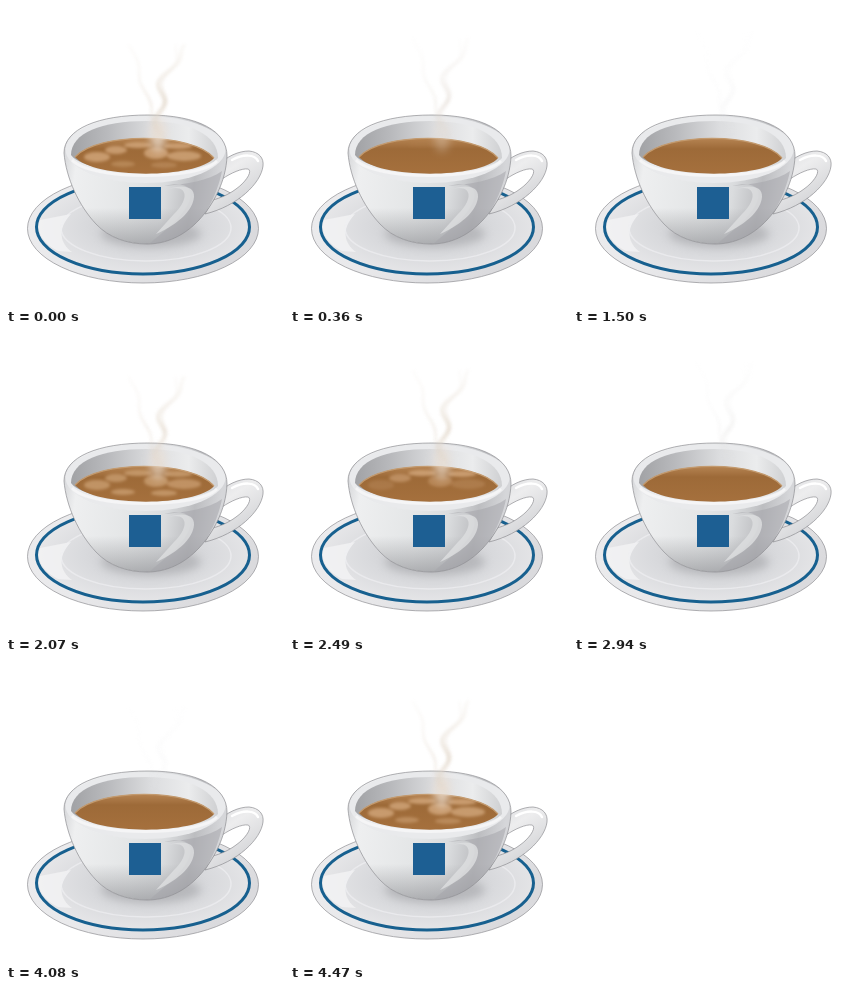
Animation of 278 by 300 pixels, one loop 4.5 s. Source, as an HTML page:

```html
<!DOCTYPE html>
<html lang="en">
<head>
<meta charset="utf-8">
<title>Coffee cup</title>
<style>
  html, body { margin: 0; width: 100%; height: 100%; overflow: hidden; background: #fff; }
  svg { display: block; width: 278px; height: 300px; }
  .edge { fill: none; stroke: #8e8f92; stroke-width: .7; }
</style>
</head>
<body>
<svg viewBox="0 0 278 300">
  <defs>
    <radialGradient id="plate" cx=".52" cy=".5" r=".55">
      <stop offset="0" stop-color="#c6c7ca"/><stop offset=".55" stop-color="#d9dadd"/>
      <stop offset="1" stop-color="#e8e8ea"/>
    </radialGradient>
    <linearGradient id="plateRim" x2="1" y2=".5">
      <stop offset="0" stop-color="#ececee"/><stop offset=".5" stop-color="#e9e9eb"/>
      <stop offset="1" stop-color="#dadadd"/>
    </linearGradient>
    <linearGradient id="body" x2="1" y2=".12">
      <stop offset="0" stop-color="#cdced1"/><stop offset=".12" stop-color="#eeeff0"/>
      <stop offset=".5" stop-color="#e3e5e6"/><stop offset=".68" stop-color="#dadcde"/>
      <stop offset=".85" stop-color="#bcbdc0"/><stop offset="1" stop-color="#d5d6d9"/>
    </linearGradient>
    <linearGradient id="under" x2="0" y2="1">
      <stop offset=".72" stop-color="#8a8b8f" stop-opacity="0"/><stop offset="1" stop-color="#8a8b8f" stop-opacity=".6"/>
    </linearGradient>
    <linearGradient id="wall" x2="1">
      <stop offset="0" stop-color="#a1a2a5"/><stop offset=".25" stop-color="#b9babd"/>
      <stop offset=".55" stop-color="#dcdddf"/><stop offset=".8" stop-color="#ebeced"/>
      <stop offset="1" stop-color="#cfd0d2"/>
    </linearGradient>
    <linearGradient id="grip" x2=".6" y2="1">
      <stop offset="0" stop-color="#d9dadd"/><stop offset=".4" stop-color="#ededee"/>
      <stop offset="1" stop-color="#cfd0d3"/>
    </linearGradient>
    <linearGradient id="coffee" x2="0" y2="1">
      <stop offset="0" stop-color="#b58352"/><stop offset=".3" stop-color="#9d6a38"/>
      <stop offset="1" stop-color="#a5703d"/>
    </linearGradient>
    <linearGradient id="fade" gradientUnits="userSpaceOnUse" x1="0" y1="36" x2="0" y2="136">
      <stop offset="0" stop-color="#fff" stop-opacity=".15"/><stop offset=".35" stop-color="#fff" stop-opacity=".5"/>
      <stop offset=".6" stop-color="#fff"/><stop offset="1" stop-color="#fff" stop-opacity="0"/>
    </linearGradient>
    <mask id="steamMask" maskUnits="userSpaceOnUse" x="0" y="0" width="278" height="300">
      <rect width="278" height="300" fill="url(#fade)"/>
    </mask>
    <filter id="soft" filterUnits="userSpaceOnUse" x="0" y="0" width="278" height="300"><feGaussianBlur stdDeviation="1.6"/></filter>
    <filter id="shade" filterUnits="userSpaceOnUse" x="0" y="0" width="278" height="300"><feGaussianBlur stdDeviation="4"/></filter>
    <path id="bowl" d="M58 147C58 123 92 109 142 109S221 125 221 150C220 176 207 199 193 214C178 230 160 238 141 238C122 238 103 232 90 218C73 200 60 172 58 147Z"/>
    <path id="surface" d="M69 151C92 126 186 126 208 152C190 173 88 173 69 151Z"/>
    <clipPath id="inBowl"><use href="#bowl"/></clipPath>
    <clipPath id="inCoffee"><use href="#surface"/></clipPath>
  </defs>

  <ellipse cx="137" cy="222.5" rx="115.5" ry="54.5" fill="url(#plateRim)"/>
  <ellipse cx="137" cy="222.5" rx="115.5" ry="54.5" class="edge"/>
  <ellipse cx="137" cy="221" rx="106.5" ry="47" fill="url(#plate)" stroke="#17608f" stroke-width="3"/>
  <path d="M34 214L65 208C50 224 55 238 66 246L52 245C35 236 30 224 34 214Z" fill="#f4f4f5" opacity=".8"/>
  <ellipse cx="140" cy="222" rx="85" ry="33" fill="none" stroke="#f0f0f2" stroke-width="1.5" opacity=".7"/>
  <ellipse cx="145" cy="228" rx="50" ry="13" fill="#9b9ca0" opacity=".5" filter="url(#shade)"/>

  <path d="M211 160C221 150 233 145 243 145C253 146 258 152 257 160C255 177 232 200 199 208L207 194C214 192 222 189 230 183C240 176 247 165 242 163C236 162 225 167 216 173Z"
        fill="url(#grip)" stroke="#8e8f92" stroke-width=".7"/>
  <path d="M226 154C237 148 249 148 252 155" fill="none" stroke="#fff" stroke-width="2.5" stroke-linecap="round"/>

  <use href="#bowl" fill="url(#body)"/>
  <g clip-path="url(#inBowl)">
    <use href="#bowl" fill="url(#under)"/>
    <path d="M158 180C182 174 190 184 181 200C172 215 158 225 143 238L172 236C198 216 211 190 216 165C202 175 181 178 158 180Z" fill="#a6a7ab" opacity=".55"/>
    <path d="M162 183C183 178 183 194 168 208L150 228C175 217 187 203 188 191C189 180 176 178 162 183Z" fill="#dfe0e2" opacity=".8"/>
  </g>
  <ellipse cx="139.5" cy="143.5" rx="80" ry="33.5" fill="#e9eaec"/>
  <path d="M65 149C65 127 96 115 140 115S212 129 212 152C196 172 82 172 65 149Z" fill="url(#wall)"/>
  <path d="M66 154C84 174 192 175 211 155" fill="none" stroke="#f5f5f6" stroke-width="3"/>
  <use href="#surface" fill="url(#coffee)"/>
  <path d="M69 151C92 126 186 126 208 152" fill="none" stroke="#c39a6e" stroke-width="1.2"/>
  <g clip-path="url(#inCoffee)"><g id="froth" fill="#d8ae83" filter="url(#soft)"></g></g>
  <use href="#bowl" class="edge"/>
  <rect x="123" y="181" width="32" height="32" fill="#1d5f93"/>
  <ellipse id="haze" cx="152" cy="129" rx="8" ry="17" fill="#ecdfd2" filter="url(#shade)"/>
  <g mask="url(#steamMask)"><g id="steam" fill="none" stroke-linecap="round" filter="url(#soft)"></g></g>
</svg>
<script>
const LOOP = 4500, STEP = 30, SETTLED = 1200;
const starts = [1920, 4080];
const svgNS = 'http://www.w3.org/2000/svg';
const [froth, haze, steam] = ['froth', 'haze', 'steam'].map(id => document.getElementById(id));

function add(parent, tag, attrs) {
  const el = document.createElementNS(svgNS, tag);
  for (const key in attrs) el.setAttribute(key, attrs[key]);
  return parent.appendChild(el);
}

const clamp = v => Math.max(0, Math.min(1, v));

// Linear interpolation through [time, value] points
function track(points, t) {
  for (let i = 1; i < points.length; i++) {
    const [t0, a] = points[i - 1], [t1, b] = points[i];
    if (t <= t1) return a + (b - a) * (t - t0) / (t1 - t0);
  }
  return points[points.length - 1][1];
}

// x, y, rx, ry
const blobs = [
  [91, 151, 13, 5], [110, 144, 11, 4], [132, 139, 14, 3], [150, 147, 12, 6],
  [178, 150, 17, 5], [172, 140, 14, 3], [158, 159, 13, 3], [117, 158, 12, 3]
].map(([cx, cy, rx, ry]) => ({ cy, el: add(froth, 'ellipse', { cx, cy, rx, ry }) }));

// A wavy strand that bends sideways as it climbs
function addStrand(x, bend, power, sway, width, opacity) {
  let d = '';
  for (let y = 142; y >= 40; y -= 2) {
    const u = Math.max(0, (118 - y) / 71);
    const px = x + bend * u ** power + sway * Math.cos((y - 97) / 6.4);
    d += (d ? 'L' : 'M') + px.toFixed(1) + ' ' + y;
  }
  add(steam, 'path', { d, 'stroke-width': width, opacity });
}
addStrand(153, 22, 3, 5, 4, .75);
addStrand(155, 15, 2, 4, 2.5, .5);
addStrand(149, -22, 1, 2, 3, .4);

function draw(now) {
  const t = Math.floor(now % LOOP / STEP) * STEP;
  const age = Math.min(...starts.map(s => (t - s + LOOP) % LOOP));

  // Froth clears from the front of the cup to the back
  for (const { cy, el } of blobs) {
    const gone = (age - 300 - (160 - cy) * 14) / 200;
    el.setAttribute('opacity', .7 * clamp(age / 180) * clamp(1 - gone));
  }

  const warm = track([[0, 0], [150, 1], [600, 1], [1100, 0]], age);
  steam.setAttribute('stroke', `rgb(${226 - warm * 4}, ${226 - warm * 18}, ${228 - warm * 36})`);
  steam.setAttribute('opacity', track([[0, .15], [150, .65], [420, .8], [600, .75], [SETTLED, .22]], age));
  steam.setAttribute('transform', `translate(0 ${track([[0, 6], [SETTLED, -13]], age)})`);
  haze.setAttribute('opacity', track([[0, 0], [180, .75], [500, .75], [1000, 0]], age));
}

const begin = performance.now();
function tick() {
  draw(performance.now() - begin);
  requestAnimationFrame(tick);
}
tick();
</script>
</body>
</html>
```
